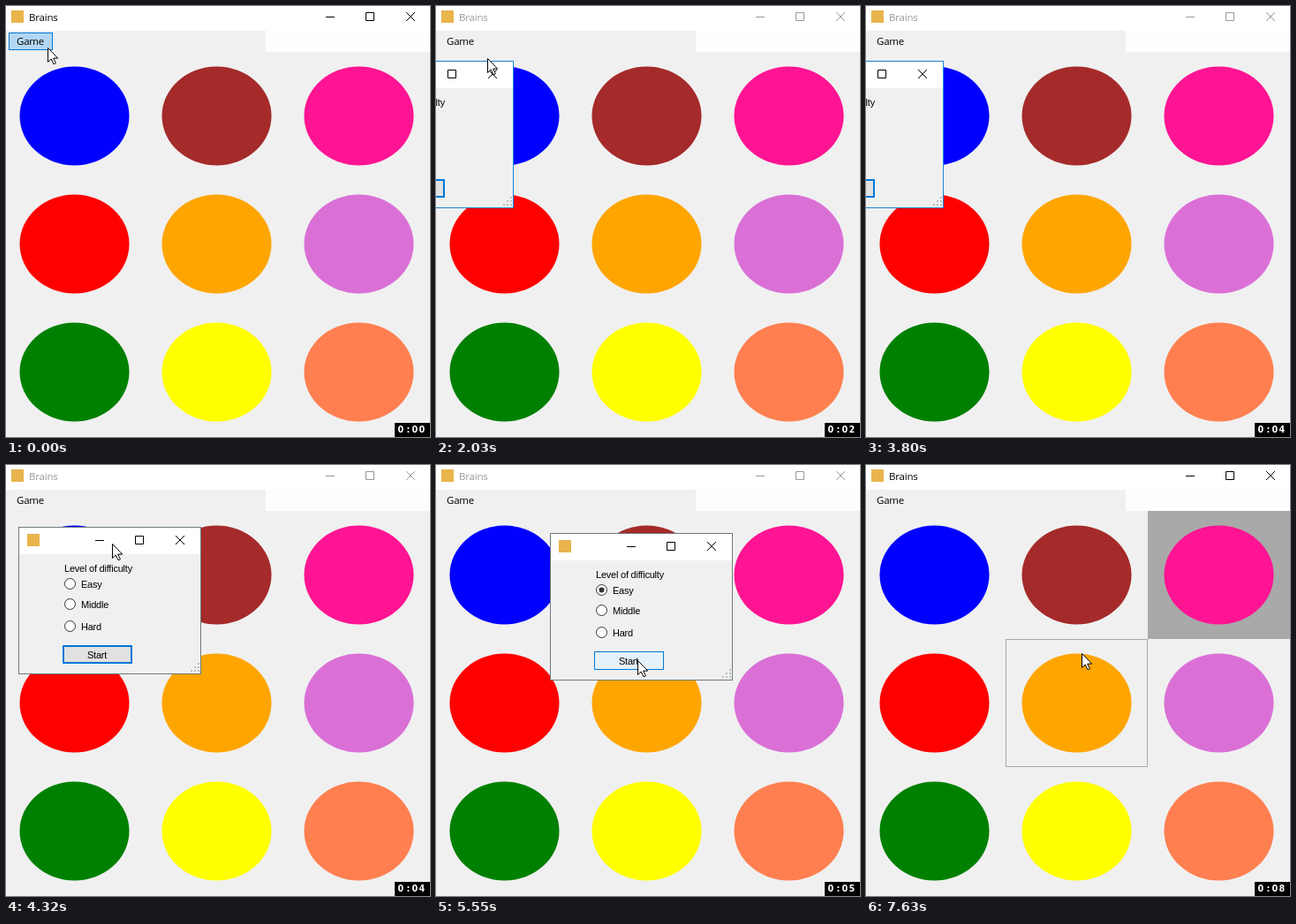
An HTML page for the animation above (8000 ms loop, 480x488 px).

```html
<!DOCTYPE html>
<html lang="en">
<head>
<meta charset="utf-8">
<title>Brains</title>
<style>
  html, body { margin: 0; width: 100%; height: 100%; overflow: hidden; background: #f0f0f0; }
  svg { display: block; width: 480px; height: 488px; }
  .ui { font: 11.5px "Open Sans", "Noto Sans", sans-serif; letter-spacing: -.2px; }
  .form { font: 11px "Liberation Sans", Arial, sans-serif; letter-spacing: -.22px; }
  .clock { font: bold 9.6px "DejaVu Sans", sans-serif; fill: #fff; }
  .line { fill: none; stroke: currentColor; }
  rect { shape-rendering: crispEdges; }
</style>
</head>
<body>
<svg viewBox="0 0 480 488">
  <rect width="480" height="488" fill="#f0f0f0"/>
  <rect width="480" height="28" fill="#fff"/>
  <rect x="294" y="28" width="186" height="24" fill="#fdfdfd"/>
  <rect x="6" y="5" width="14" height="14" fill="#e9b44c"/>
  <g id="caption">
    <text class="ui" x="26" y="17" fill="currentColor">Brains</text>
    <path class="line" d="M362 12.5h10M407.5 7.5h9v9h-9zM453 7l10 10m0-10l-10 10"/>
  </g>

  <rect id="hint" x="319" y="52" width="161" height="145" fill="#a9a9a9"/>
  <g id="board"></g>
  <rect id="frame" x="158.5" y="197.5" width="160" height="144" fill="none" stroke="#a9a9a9"/>

  <rect id="tab" x="3.5" y="30.5" width="49" height="19"/>
  <g id="menu">
    <rect x="3.5" y="49.5" width="131" height="27" fill="#fdfdfd" stroke="#808080"/>
    <rect x="4" y="50" width="25" height="26" fill="#f0f0f0"/>
    <rect id="item" x="5.5" y="52.5" width="127" height="21" fill="#b3d7f3" stroke="#0078d7"/>
    <text class="ui" x="36" y="67">New game</text>
  </g>
  <text class="ui" x="12" y="44">Game</text>

  <g id="dialog" class="form">
    <rect id="edge" x=".5" y=".5" width="206" height="166" fill="#f0f0f0"/>
    <rect x="1" y="1" width="205" height="30" fill="#fff"/>
    <rect x="10" y="8" width="14" height="14" fill="#e9b44c"/>
    <path class="line" d="M87 15.5h10M132.5 10.5h9v9h-9zM178 10l10 10m0-10l-10 10"/>
    <text x="52" y="51">Level of difficulty</text>
    <g id="radios"></g>
    <circle id="dot" cx="58.5" cy="64.5" r="3"/>
    <rect id="start"/>
    <text x="78" y="149">Start</text>
    <path d="M203 157v2m0 2v2m0 -2M199 161v2M195 0" stroke="none"/>
    <g id="grip" fill="#bdbdbd"></g>
  </g>

  <path id="cursor" d="M.5 .5v16l3.7-3.5 2.8 5.8 2.4-1.1-2.7-5.6h5z" fill="#fff" stroke="#000"/>
  <rect x="440" y="472" width="40" height="16"/>
  <text class="clock" x="443.5 453.5 459.5 467.5" y="483" id="clock">0:00</text>
</svg>
<script>
const LOOP = 8000;
const $ = id => document.getElementById(id);
const set = (id, attrs) => {
  for (const k in attrs) $(id).setAttribute(k, attrs[k]);
};
const show = (id, on) => set(id, { visibility: on ? "visible" : "hidden" });

const colors = ["blue", "brown", "deeppink", "red", "orange", "orchid", "green", "yellow", "coral"];
$("board").innerHTML = colors.map((c, i) =>
  `<ellipse cx="${77.5 + i % 3 * 161}" cy="${124.5 + (i / 3 | 0) * 145}" rx="62" ry="56" fill="${c}"/>`).join("");

$("radios").innerHTML = ["Easy", "Middle", "Hard"].map((name, i) => {
  const y = [64.5, 87.5, 112.5][i];
  return `<circle cx="58.5" cy="${y}" r="6" fill="#fff" stroke="#333"/><text x="71" y="${y + 4}">${name}</text>`;
}).join("");
const easy = $("radios").firstChild;

$("grip").innerHTML = [[0, 0], [-4, 0], [-8, 0], [0, -4], [-4, -4], [0, -8]].map(([x, y]) =>
  `<rect x="${203 + x}" y="${162 + y}" width="2" height="2"/>`).join("");

// [time, x, y]
const cursorPath = [
  [30, 47, 47], [250, 54, 51], [520, 54, 51], [660, 41, 43], [1420, 41, 43], [1680, 58, 59],
  [2340, 58, 59], [2600, 28, 94], [2850, 8, 108], [3130, 47, 90], [3160, 47, 90], [3210, 13, 72],
  [3460, 13, 72], [3799, 4, 66], [3800, -13, 81], [4230, -13, 81], [4400, 235, 96],
  [4770, 235, 96], [4900, 207, 133], [5020, 195, 142], [5200, 195, 142], [5550, 228, 221],
  [7490, 228, 221], [7630, 244, 213]
];
const dialogPath = [[4230, -119, 62], [4400, 129, 77]];
const ticks = [900, 1860, 2750, 3700, 4770, 5670, 6630, 7600];

function along(path, t) {
  const i = path.findIndex(p => p[0] > t);
  if (i === 0) return path[0].slice(1);
  if (i < 0) return path[path.length - 1].slice(1);
  const [a, x, y] = path[i - 1], [b, u, v] = path[i];
  const k = (t - a) / (b - a);
  return [Math.round(x + (u - x) * k), Math.round(y + (v - y) * k)];
}

function draw(t) {
  const during = (from, to) => t >= from && t < to;
  const [x, y] = along(cursorPath, t);
  const [dx, dy] = along(dialogPath, t);
  const over = (l, top, r, b) => x >= l && x < r && y >= top && y < b;
  set("cursor", { transform: `translate(${x} ${y})` });
  set("dialog", { transform: `translate(${dx} ${dy})` });
  set("caption", { color: during(1860, 6030) ? "#999" : "#000" });

  const open = during(950, 1860);
  show("menu", open);
  show("item", open && y >= 52);
  show("tab", open || t < 950 && over(3, 30, 53, 50));
  set("tab", open ? { fill: "#fdfdfd", stroke: "#808080" } : { fill: "#b3d7f3", stroke: "#0078d7" });

  const dialog = during(1950, 5960), picked = t >= 5100;
  const overEasy = t >= 4770 && over(180, 132, 232, 152);
  const overStart = t >= 5200 && over(179, 211, 258, 232);
  show("dialog", dialog);
  show("dot", dialog && picked);
  set("edge", { stroke: t < 4230 ? "#1883d7" : "#6d7a7a" });
  set("dot", { fill: overEasy ? "#0078d7" : "#333" });
  easy.setAttribute("stroke", overEasy ? "#0078d7" : "#333");
  const w = picked && !during(5670, 5960) ? 1 : 2;
  set("start", {
    x: 50 + w / 2, y: 134 + w / 2, width: 79 - w, height: 21 - w, "stroke-width": w,
    fill: during(5670, 5780) ? "#cce4f7" : overStart ? "#e5f1fb" : "#e1e1e1",
    stroke: picked && !overStart ? "#adadad" : "#0078d7"
  });

  show("frame", t >= 6110);
  show("hint", t >= 7090);
  $("clock").textContent = "0:0" + ticks.filter(s => t >= s).length;
}

function loop() {
  draw(performance.now() % LOOP);
  requestAnimationFrame(loop);
}
loop();
</script>
</body>
</html>
```
